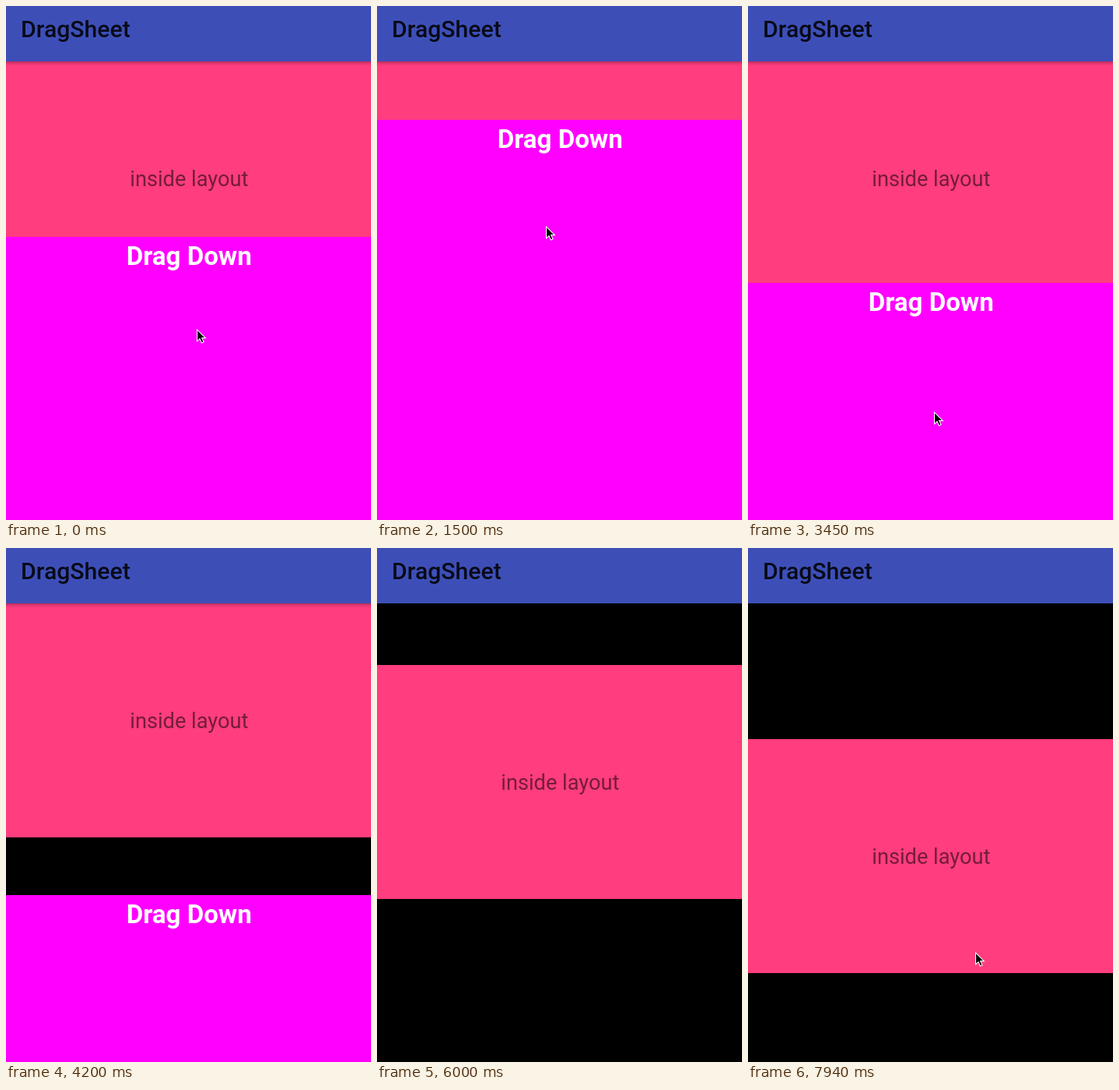
An HTML page that plays this animation: 469 px wide and 659 px high, repeating every 8 s.

```html
<!DOCTYPE html>
<html lang="en">
<head>
<meta charset="utf-8">
<title>DragSheet</title>
<style>
  html, body { margin: 0; width: 100%; height: 100%; overflow: hidden; background: #000; }
  svg { display: block; width: 469px; height: 659px; font-family: Roboto, sans-serif; }
</style>
</head>
<body>
<svg viewBox="0 0 469 659">
  <defs>
    <linearGradient id="shade" x1="0" y1="0" x2="0" y2="1">
      <stop offset="0" stop-opacity=".28"/>
      <stop offset=".5" stop-opacity=".09"/>
      <stop offset="1" stop-opacity="0"/>
    </linearGradient>
  </defs>
  <rect width="469" height="659"/>
  <g id="panel">
    <rect width="469" height="300" fill="#ff3d7f"/>
    <text x="235.3" y="160" font-size="27.2" text-anchor="middle" fill-opacity=".54">inside layout</text>
  </g>
  <g id="sheet">
    <rect width="469" height="659" fill="#f0f"/>
    <text x="235.2" y="35.7" font-size="33.1" font-weight="700" text-anchor="middle" fill="#fff">Drag Down</text>
  </g>
  <rect y="71" width="469" height="6" fill="url(#shade)"/>
  <rect width="469" height="71" fill="#3d4fb7"/>
  <text x="19" y="40" font-size="30.2" font-weight="500" fill-opacity=".87">DragSheet</text>
  <g id="cursor">
    <path transform="translate(0 -.6) scale(1.08)" d="M.5 .5V14.3L3.7 11.3L5.9 16.3L8.4 15.2L6.2 10.4H10.5Z" stroke="#fff"/>
  </g>
</svg>
<script>
  const LOOP = 8000, STEP = 150, OFF = 660;
  const start = { sheet: 296, panel: 71, x: 245, y: 415 };

  // The screen updates once per STEP; power bends the progress of a move.
  const moves = [
    { at: 300, steps: 5, to: { sheet: 135, x: 229, y: 254 } },
    { at: 1350, steps: 1, to: { sheet: 71, x: 226, y: 190 } },
    { at: 1500, steps: 3, to: { sheet: 296, x: 198, y: 470 } },
    { at: 2100, steps: 4, to: { x: 234, y: 321 } },
    { at: 3150, steps: 4, to: { x: 240, y: 587 } },
    { at: 3450, steps: 2, to: { sheet: 414 } },
    { at: 4050, steps: 1, to: { y: OFF } },
    { at: 4050, steps: 5, to: { sheet: OFF }, power: 2.26 },
    { at: 5700, steps: 7, to: { panel: 285 }, power: 1.18 },
    { at: 6900, steps: 1, to: { x: 252, y: 605 } },
    { at: 7050, steps: 1, to: { x: 292, y: 519 } },
    { at: 7640, steps: 3, to: { panel: 245 } }
  ];

  function stateAt(t) {
    const state = { ...start };
    for (const { at, steps, to, power = 1 } of moves) {
      if (t < at) continue;
      const done = Math.min(steps, Math.floor((t - at) / STEP) + 1);
      const progress = (done / steps) ** power;
      for (const key in to) state[key] += (to[key] - state[key]) * progress;
    }
    return state;
  }

  function place(id, x, y) {
    document.getElementById(id)
      .setAttribute("transform", `translate(${Math.round(x)} ${Math.round(y)})`);
  }

  function draw() {
    const { sheet, panel, x, y } = stateAt(performance.now() % LOOP);
    place("sheet", 0, sheet);
    place("panel", 0, panel);
    place("cursor", x, y);
    requestAnimationFrame(draw);
  }
  draw();
</script>
</body>
</html>
```
